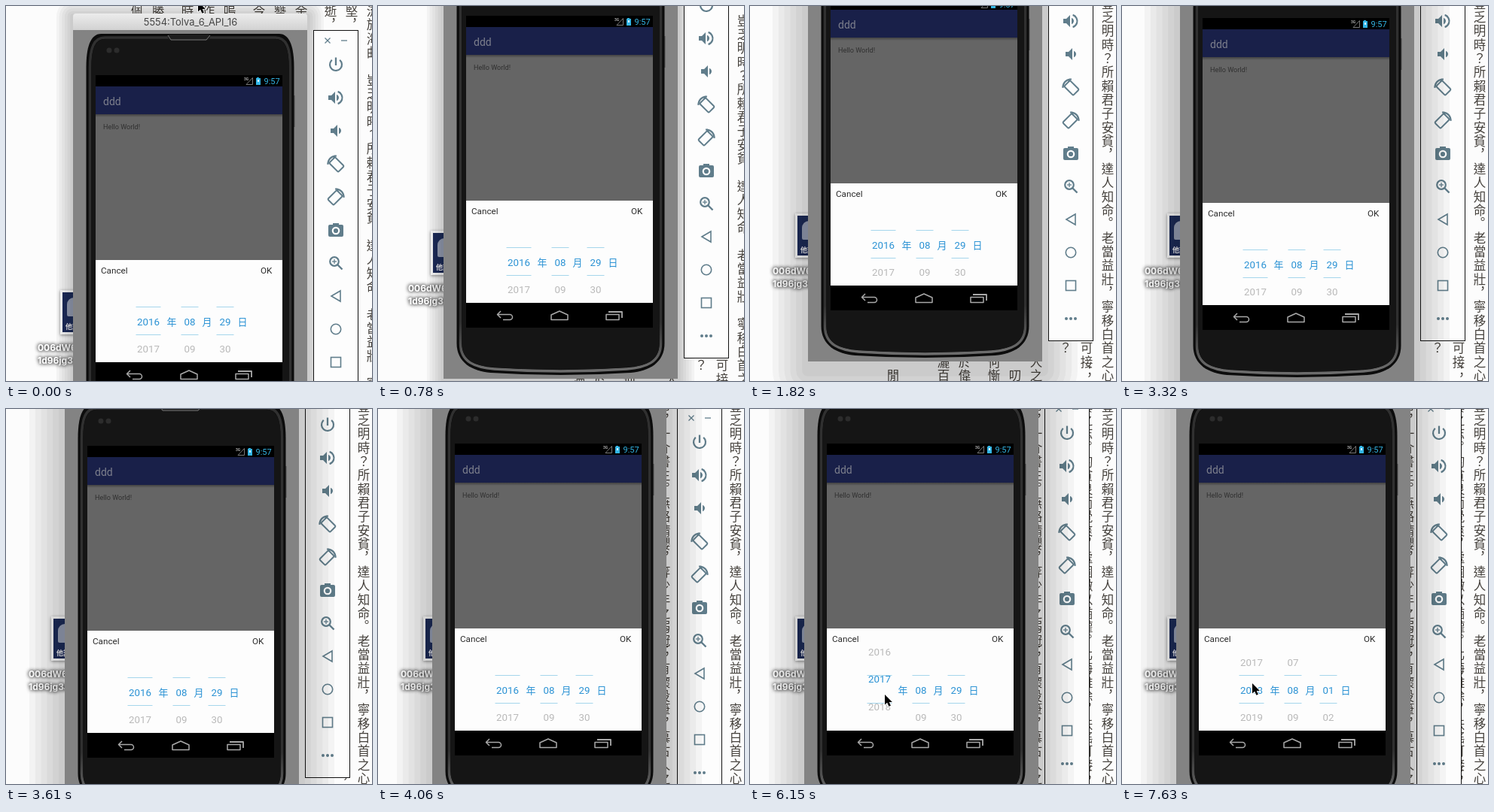
Recreate the animation shown at these times as an HTML page with a canvas. Size 486 by 499 pixels, loop 8 s.

```html
<!DOCTYPE html>
<html lang="zh-Hant">
<head>
<meta charset="utf-8">
<style>
html, body { margin: 0; width: 100%; height: 100%; overflow: hidden; background: #fcfcfc; }
canvas { display: block; }
</style>
</head>
<body>
<canvas id="stage" width="486" height="499"></canvas>
<script>
const W = 486, H = 499, LOOP = 8000, ROW = 36.5, TICK = 148;
const ctx = document.getElementById('stage').getContext('2d');
const SANS = 'Roboto, sans-serif';
const UI = 'Inter, sans-serif';
const CJK = '"Noto Sans CJK TC", "Noto Sans CJK", sans-serif';
const BLUE = '#2a92d4', SLATE = '#607d8b';

// Progress 0..1 in n jumps, the first one at the start time
function stepped(t, start, n) {
  const jumps = Math.floor((t - start) / TICK + 1.1);
  return Math.min(Math.max(jumps, 0), n) / n;
}

const easeOut = p => 1 - (1 - p) ** 2.15;
const mix = (a, b, p) => a + (b - a) * p;

function viewAt(t) {
  const p = stepped(t, 640, 4);
  return [-12 * p ** 2.6, -102 * easeOut(p)].map(Math.round);
}

function windowAt(t) {
  const [x, y] = viewAt(t);
  const rise = easeOut(stepped(t, 3320, 5));
  const settle = stepped(t, 4060, 1);
  return [Math.round(x + rise - 6 * settle), Math.round(y + 68 * rise - 12 * settle)];
}

function pointerAt(t) {
  if (t < 4510) return [255 - 10 * stepped(t, 300, 1), -6 - 9 * stepped(t, 300, 1)];
  const down = easeOut(stepped(t, 4510, 5));
  const pull = stepped(t, 5400, 3);
  const again = stepped(t, 6300, 8);
  return [
    mix(213, 175, down) + 4 * pull - 6 * again,
    mix(211, 397, down) - 17 * pull - 15 * again
  ];
}

function yearScroll(t) {
  const second = easeOut(stepped(t, 6300, 10));
  return 51 * stepped(t, 5400, 3) + (2 * ROW - 51) * second;
}

function rect(x, y, w, h, fill) {
  ctx.fillStyle = fill;
  ctx.fillRect(x, y, w, h);
}

function round(x, y, w, h, r, fill) {
  ctx.beginPath();
  ctx.roundRect(x, y, w, h, r);
  if (fill) {
    ctx.fillStyle = fill;
    ctx.fill();
  }
}

function fade(y, h, from, to) {
  const g = ctx.createLinearGradient(0, y, 0, y + h);
  g.addColorStop(0, from);
  g.addColorStop(1, to);
  return g;
}

function text(str, x, y, size, color, align = 'left', weight = 400, family = SANS) {
  ctx.font = `${weight} ${size}px ${family}`;
  ctx.textAlign = align;
  ctx.fillStyle = color;
  ctx.fillText(str, x, y + size * 0.355);
}

function trace(points, close) {
  ctx.beginPath();
  for (const [x, y] of points) ctx.lineTo(x, y);
  if (close) ctx.closePath();
}

function line(points, color, width = 1, close = false) {
  trace(points, close);
  ctx.strokeStyle = color;
  ctx.lineWidth = width;
  ctx.stroke();
}

function arc(x, y, r, from = 0, to = 360) {
  ctx.beginPath();
  ctx.arc(x, y, r, from * Math.PI / 180, to * Math.PI / 180);
}

function dot(x, y, r, fill) {
  arc(x, y, r);
  ctx.fillStyle = fill;
  ctx.fill();
}

function shifted([x, y], draw) {
  ctx.save();
  ctx.translate(x, y);
  draw();
  ctx.restore();
}

// Vertical verses from right to left, in groups of three columns;
// the second part stands at the foot of a column whose middle is covered
const verses = [
  ['流於海曲，豈乏明時？所賴君子安貧，達人知命。老當益壯，寧移白首之心'],
  ['堅，不墜青雲之志。酌貪泉而覺爽，處涸轍以猶懽。北海雖賒，扶搖可接；'],
  ['逝，桑榆非晚。志士高潔，空懷報國之情；酒客猖狂，豈效窮途之哭？'],
  ['余，三尺微命，一介書生。無路請纓，等少年之弱冠；有懷投筆，慕古人之長風'],
  ['簪', '　叨'], ['今', '何慚'], ['嗚', '於偉'], ['作', '灑百'], ['時'], ['勝', '　閒'], ['佩']
];

function wallpaper() {
  verses.forEach(([head, foot = ''], i) => {
    const x = 487 - 95 * Math.floor(i / 3) - 28 * (i % 3);
    [...head.padEnd(31, '　') + foot].forEach((ch, row) => {
      const mark = '，。；'.includes(ch);
      text(ch, x + (mark ? 4 : 0), 7 + row * 18.35 - (mark ? 6 : 0), 16.5, '#45413c',
        'center', 400, CJK);
    });
  });
}

function desktopFile() {
  ctx.save();
  ctx.shadowColor = 'rgba(0,0,0,.45)';
  ctx.shadowBlur = 4;
  ctx.shadowOffsetY = 1;
  rect(72, 378, 60, 59, '#fff');
  ctx.restore();
  rect(75, 381, 54, 53, '#1d2a5b');
  round(81, 388, 18, 25, [9, 9, 2, 2], '#9aa3b8');
  text('他說', 79, 427, 9, '#fff', 'left', 700, CJK);
  ctx.save();
  ctx.shadowColor = 'rgba(0,0,0,.75)';
  ctx.shadowBlur = 5;
  for (let pass = 0; pass < 2; pass++) {
    text('006dW6kf', 42, 455, 12, '#fff', 'left', 700, UI);
    text('1d96jg3a', 42, 472, 12, '#fff', 'left', 700, UI);
  }
  ctx.restore();
}

function shadow(active) {
  const reach = active ? 47 : 22, drop = active ? 12 : 4;
  for (let i = 0; i < 6; i++) {
    const d = reach * (1 - i / 6);
    round(89 - d, 10 - d + drop, 311 + d * 2, 565 + d * 2, d, 'rgba(0,0,0,.036)');
  }
}

function caseShape(inset) {
  const mid = 244.5, half = 138 - inset, top = 37 + inset, bottom = 570 - inset;
  const side = (dir, x) => mid + dir * (half - x);
  ctx.beginPath();
  ctx.moveTo(side(-1, 0), 82);
  ctx.bezierCurveTo(side(-1, 0), 56, side(-1, 5), top, side(-1, 20), top);
  ctx.lineTo(side(1, 20), top);
  ctx.bezierCurveTo(side(1, 5), top, side(1, 0), 56, side(1, 0), 82);
  ctx.lineTo(side(1, 0), 528);
  ctx.bezierCurveTo(side(1, 0), 553, side(1, 20), bottom - 5, side(1, 45), bottom - 3);
  ctx.quadraticCurveTo(mid, bottom + 3, side(-1, 45), bottom - 3);
  ctx.bezierCurveTo(side(-1, 20), bottom - 5, side(-1, 0), 553, side(-1, 0), 528);
  ctx.closePath();
}

function phoneCase() {
  rect(381, 119, 2.5, 42, '#555');
  caseShape(0);
  ctx.fillStyle = '#0c0c0c';
  ctx.fill();
  caseShape(5);
  ctx.strokeStyle = fade(500, 60, '#303030', '#6c6c6c');
  ctx.lineWidth = 3.5;
  ctx.stroke();
  caseShape(7);
  ctx.fillStyle = '#151515';
  ctx.fill();
  round(215, 38, 56, 8, [2, 2, 5, 5], '#1d1d1d');
  line([[215, 39], [219, 45], [266, 45], [271, 39]], '#777');
  for (const x of [137, 147]) dot(x, 59, 3.5, '#2c2c2c');
}

function statusBar() {
  rect(119, 92, 248, 15, '#000');
  text('3G', 316, 97, 5, '#aaa', 'left', 700);
  line([[319, 104.5], [327.5, 104.5], [327.5, 95.5]], '#777', 1, true);
  rect(333, 95, 3, 2, '#33b5e5');
  rect(332, 96, 6, 9, '#33b5e5');
  rect(334, 98, 2, 3, '#d9f4ff');
  text('9:57', 342.5, 100.5, 11, '#33b5e5');
}

function navBar() {
  const c = '#a9a9a9';
  rect(119, 474, 248, 33, '#000');
  ctx.lineJoin = 'round';
  line([[165, 485], [160.5, 489.5], [165, 494]], c, 1.5);
  ctx.beginPath();
  ctx.moveTo(161, 489.5);
  ctx.lineTo(177, 489.5);
  ctx.arc(177, 493, 3.5, -Math.PI / 2, Math.PI / 2);
  ctx.lineTo(168, 496.5);
  ctx.stroke();
  line([[232, 496.5], [232, 490], [243, 485], [254, 490], [254, 496.5]], c, 1.5, true);
  ctx.strokeRect(305, 489.5, 17, 7);
  line([[308, 486], [326, 486], [326, 494]], c, 1.8);
}

// A column of values; those between the two lines are blue
function wheel(x, half, first, labels, scroll = 0) {
  const band = (y, h, color) => {
    ctx.save();
    ctx.beginPath();
    ctx.rect(x - half - 4, y, half * 2 + 8, h);
    ctx.clip();
    labels.forEach((label, i) =>
      text(label, x, 420 + (first + i) * ROW - scroll, 13.3, color, 'center'));
    ctx.restore();
  };
  band(364, 37, '#b9b9b9');
  band(401, 36, BLUE);
  band(437, 29, '#b9b9b9');
  for (const y of [400, 437]) rect(x - half, y, half * 2, 1, '#a5d6ec');
}

function dialog(t) {
  const scroll = yearScroll(t);
  const pastFirst = scroll > 1.5 * ROW;
  rect(119, 338, 248, 136, '#fdfdfd');
  text('Cancel', 126, 351.5, 11.7, '#2a2a2a');
  text('OK', 338, 351.5, 11.7, '#2a2a2a');
  wheel(189, 16.5, 0, ['2016', '2017', '2018', '2019'], scroll);
  wheel(244, 11.5, pastFirst ? -1 : 0, pastFirst ? ['07', '08', '09'] : ['08', '09']);
  wheel(291, 11.5, 0, pastFirst ? ['01', '02'] : ['29', '30']);
  [...'年月日'].forEach((ch, i) => text(ch, 220 + i * 47, 420, 13, BLUE, 'center', 400, CJK));
}

function emulator(t) {
  round(89, 10, 311, 22, [4, 4, 0, 0], fade(10, 22, '#ececec', '#d2d2d2'));
  text('5554:Tolva_6_API_16', 245, 21.5, 12.9, '#454545', 'center', 400, UI);
  rect(89, 32, 311, 543, '#838383');
  phoneCase();
  statusBar();
  rect(119, 107, 248, 37, '#192049');
  text('ddd', 129, 127, 14, '#7d7f8c');
  rect(119, 144, 248, 194, '#656565');
  rect(119, 144, 248, 4, fade(144, 4, 'rgba(0,0,0,.35)', 'rgba(0,0,0,0)'));
  text('Hello World!', 129, 161, 9.1, '#303030');
  dialog(t);
  navBar();
}

// Each icon is drawn around its own centre
function speaker(x) {
  trace([[x, -3], [x + 4, -3], [x + 9, -8], [x + 9, 8], [x + 4, 3], [x, 3]], true);
  ctx.fill();
  arc(x + 9.5, 0, 4.5, -70, 70);
  ctx.fill();
}

function turn(side) {
  ctx.scale(side, 1);
  arc(0, 0, 10.5, 175, 275);
  ctx.stroke();
  line([[-1, -11], [-3, -7]], SLATE, 2);
  ctx.translate(1, 1);
  ctx.rotate(Math.PI / 4);
  round(-8.5, -5.5, 17, 11, 1.5);
  ctx.stroke();
}

const icons = [
  () => {
    arc(0, 0, 8, -50, 230);
    ctx.stroke();
    line([[0, -9.5], [0, 1]], SLATE, 2.3);
  },
  () => {
    speaker(-10);
    arc(0, 0, 8.5, -72, 72);
    ctx.stroke();
  },
  () => speaker(-7),
  () => turn(1),
  () => turn(-1),
  () => {
    round(-10, -7, 20, 16, 2, SLATE);
    rect(-4, -9, 8, 3, SLATE);
    arc(0, 1, 4.2);
    ctx.strokeStyle = '#fff';
    ctx.stroke();
  },
  () => {
    arc(-2, -2, 5.8);
    ctx.stroke();
    line([[2.5, 2.5], [8.5, 8.5]], SLATE, 2.4);
    line([[-5, -2], [1, -2]], SLATE, 1.3);
    line([[-2, -5], [-2, 1]], SLATE, 1.3);
  },
  () => line([[-6, 0], [6, -7], [6, 7]], SLATE, 1.6, true),
  () => {
    arc(0, 0, 6.7);
    ctx.lineWidth = 1.6;
    ctx.stroke();
  },
  () => {
    ctx.lineWidth = 1.6;
    ctx.strokeRect(-6.5, -6.5, 13, 13);
  },
  () => [-6, 0, 6].forEach(x => dot(x, 0, 2, SLATE))
];

function panel() {
  rect(408, 32, 60, 516, '#111');
  rect(409, 33, 58, 514, '#fdfdfd');
  for (const s of [-3.5, 3.5]) line([[427 - s, 42.5], [427 + s, 49.5]], SLATE, 1.3);
  line([[445, 46], [453, 46]], SLATE, 1.3);
  icons.forEach((icon, i) => shifted([438, 78 + i * 44], () => {
    ctx.fillStyle = ctx.strokeStyle = SLATE;
    ctx.lineWidth = 2.2;
    icon();
  }));
}

function cursor() {
  ctx.scale(0.9, 0.9);
  trace([[0, 0], [0, 15], [3.5, 12], [6, 17.5], [8.8, 16.3], [6.4, 11], [11, 11]], true);
  ctx.lineJoin = 'round';
  ctx.strokeStyle = '#fff';
  ctx.lineWidth = 2;
  ctx.stroke();
  ctx.fillStyle = '#000';
  ctx.fill();
}

function draw(t) {
  const dragged = t >= 3320;
  // The side panel follows the window one step late
  const drawPanel = () => shifted(dragged ? windowAt(t - TICK) : viewAt(t), panel);

  rect(0, 0, W, H, '#fcfcfc');
  shifted(viewAt(t), () => {
    wallpaper();
    desktopFile();
  });
  if (dragged) drawPanel();
  shifted(windowAt(t), () => {
    shadow(t >= 1820);
    emulator(t);
  });
  if (!dragged) drawPanel();
  if (t < 640 || t >= 4510) shifted(pointerAt(t), cursor);
}

function tick(now) {
  draw(now % LOOP);
  requestAnimationFrame(tick);
}
requestAnimationFrame(tick);
</script>
</body>
</html>
```
